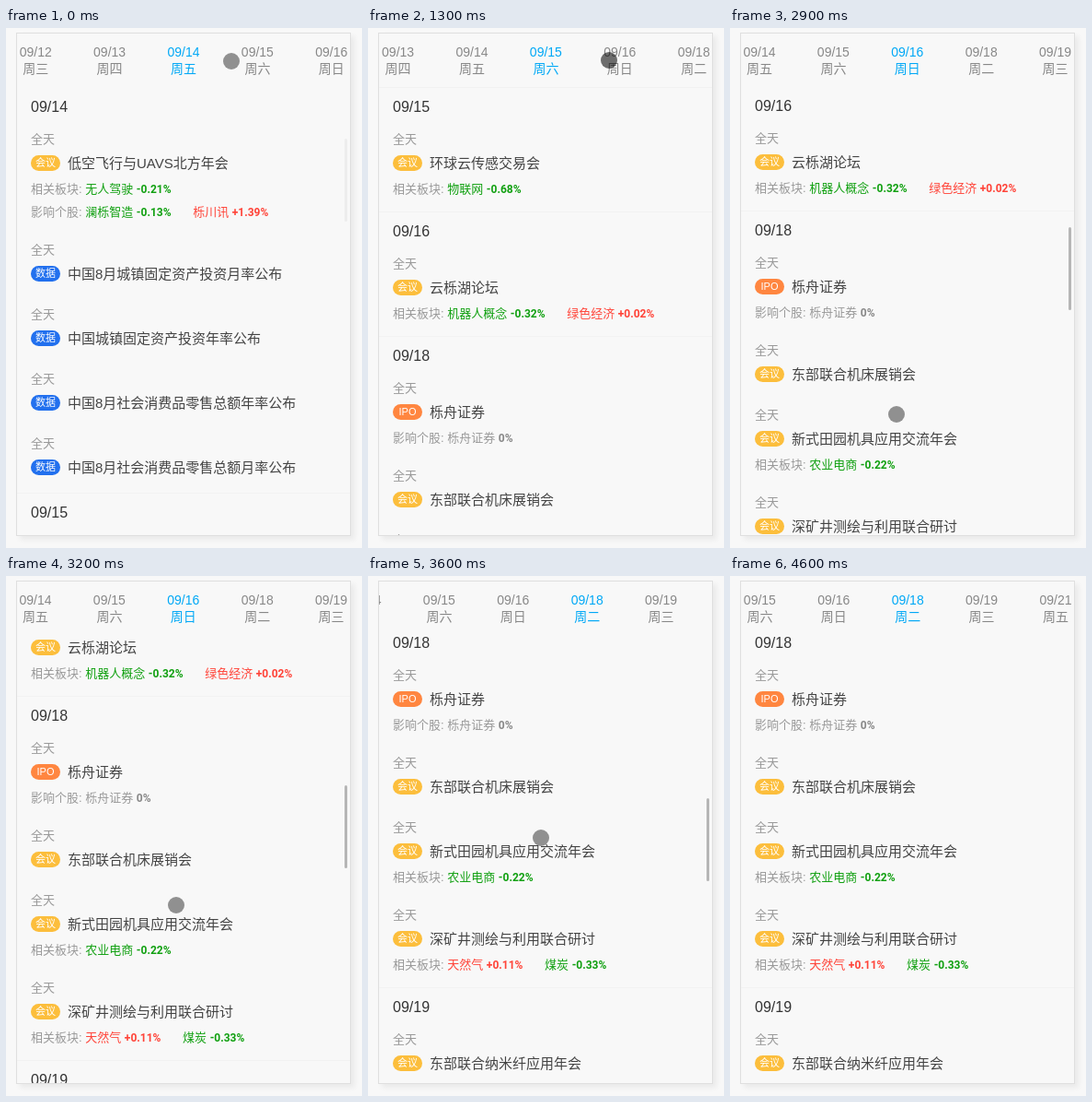
An HTML page that plays this animation: 387 px wide and 564 px high, repeating every 4700 ms.

```html
<!DOCTYPE html>
<html lang="zh-CN">
<head>
<meta charset="utf-8">
<title>财经日历</title>
<style>
  html, body { margin: 0; width: 100%; height: 100%; overflow: hidden; background: #f8f8f8; }
  body { position: relative; font-family: "Liberation Sans", "Noto Sans CJK SC", "Noto Sans CJK", sans-serif; }
  .panel {
    position: absolute; left: 11px; top: 5px; width: 362px; height: 544px;
    border: 1px solid #dfdfdf; background: #f8f8f8; overflow: hidden;
    box-shadow: 4px 4px 6px rgba(0, 0, 0, .06);
  }
  .days { position: absolute; left: 0; top: 11px; color: #888; font-size: 14px; line-height: 18px; }
  .day { position: absolute; width: 80px; text-align: center; white-space: nowrap; }
  .day.on { color: #00a8f6; }
  .view { position: absolute; left: 0; top: 58px; width: 362px; height: 486px; overflow: hidden; }
  .list { padding-left: 15px; white-space: nowrap; }
  section { position: relative; }
  section + section::before {
    content: ""; position: absolute; left: -15px; right: 0; top: 0; height: 1px; background: #f2f2f2;
  }
  h2 { margin: 0; height: 40px; font-size: 16px; font-weight: 400; line-height: 44px; color: #333; }
  .item { padding-bottom: 12px; color: #999; font-size: 13px; }
  .time { height: 34px; line-height: 34px; }
  .title { display: flex; height: 17px; margin-bottom: 7px; font-size: 15px; line-height: 17px; color: #444; }
  .tag {
    width: 32px; margin-right: 8px; border-radius: 9px;
    font-size: 11px; text-align: center; color: #fff;
  }
  .meet { background: #fcbe3c; }
  .data { background: #2270ee; }
  .ipo { background: #ff8640; }
  .info { height: 25px; line-height: 25px; }
  .info span { margin-right: 20px; }
  .info b { font: bold 12px Roboto, sans-serif; }
  .up { color: #ff4338; }
  .down { color: #11a011; }
  .flat b { color: #888; }
  .thumb {
    position: absolute; left: 356px; top: 0; width: 3px; height: 90px;
    border-radius: 2px; background: #b6b6b6;
  }
  .cursor {
    position: absolute; left: -9px; top: -9px; width: 18px; height: 18px;
    border-radius: 50%; background: #000;
  }
</style>
</head>
<body>
<div class="panel">
  <div class="days"></div>
  <div class="view"><div class="list"></div></div>
  <div class="thumb"></div>
</div>
<div class="cursor"></div>
<script>
const LOOP = 4700, STEP = 100, PITCH = 80.4;

const days = ["09/12 周三", "09/13 周四", "09/14 周五", "09/15 周六",
  "09/16 周日", "09/18 周二", "09/19 周三", "09/21 周五"];

const tags = { meet: "会议", data: "数据", ipo: "IPO" };
const SECTOR = "相关板块", STOCK = "影响个股";

// Each item: tag, title, then info lines of label and "name change" pairs
const sections = [
  ["09/14", [
    ["meet", "低空飞行与UAVS北方年会", [SECTOR, "无人驾驶 -0.21%"], [STOCK, "澜栎智造 -0.13%", "栎川讯 +1.39%"]],
    ["data", "中国8月城镇固定资产投资月率公布"],
    ["data", "中国城镇固定资产投资年率公布"],
    ["data", "中国8月社会消费品零售总额年率公布"],
    ["data", "中国8月社会消费品零售总额月率公布"]]],
  ["09/15", [
    ["meet", "环球云传感交易会", [SECTOR, "物联网 -0.68%"]]]],
  ["09/16", [
    ["meet", "云栎湖论坛", [SECTOR, "机器人概念 -0.32%", "绿色经济 +0.02%"]]]],
  ["09/18", [
    ["ipo", "栎舟证券", [STOCK, "栎舟证券 0%"]],
    ["meet", "东部联合机床展销会"],
    ["meet", "新式田园机具应用交流年会", [SECTOR, "农业电商 -0.22%"]],
    ["meet", "深矿井测绘与利用联合研讨", [SECTOR, "天然气 +0.11%", "煤炭 -0.33%"]]]],
  ["09/19", [
    ["meet", "东部联合纳米纤应用年会"]]]
];

const $ = s => document.querySelector(s);

function quote(text) {
  const [name, change] = text.split(" ");
  const trend = { "+": "up", "-": "down" }[change[0]] || "flat";
  return `<span class="${trend}">${name} <b>${change}</b></span>`;
}

const info = ([label, ...quotes]) =>
  `<div class="info">${label}: ${quotes.map(quote).join(" ")}</div>`;

const item = ([tag, title, ...lines]) =>
  `<div class="item"><div class="time">全天</div>
   <div class="title"><span class="tag ${tag}">${tags[tag]}</span>${title}</div>${lines.map(info).join("")}</div>`;

$(".list").innerHTML = sections.map(([date, items]) =>
  `<section><h2>${date}</h2>${items.map(item).join("")}</section>`).join("");

$(".days").innerHTML = days.map((d, i) =>
  `<div class="day" style="left:${141 + PITCH * (i - 2)}px">${d.replace(" ", "<br>")}</div>`).join("");

// Progress from 0 to 1 between two times
const ramp = (t, from, to) => Math.min(1, Math.max(0, (t - from) / (to - from)));
const ease = (t, from, to) => 1 - (1 - ramp(t, from, to)) ** 2;

// Two taps on the day strip, then a drag with a short glide
const drag = t => 114 * ramp(t, 2895, 3400) + 34 * ease(t, 3400, 3600);
const scroll = t => 440 * ease(t, 400, 1000) + 135 * ease(t, 1400, 1600) + drag(t);
const shift = t => ease(t, 400, 1000) + ease(t, 1400, 1600) + ease(t, 3500, 3900);

// The scroll thumb appears at once and fades over 200 ms
const flash = (t, from, to) => ramp(t, from, from + STEP) - ramp(t, to, to + 200);
const thumbAlpha = t => (t < 500 ? .17 : 0) + flash(t, 400, 800) + flash(t, 1400, 1700) + flash(t, 2800, 4000);

// Cursor moves: start, end, dx, dy
const moves = [
  [0, 200, 21, -3], [400, 1000, -14, 4], [1100, 1300, 10, -2],
  [1700, 2000, -52, 203], [2000, 2300, -25, 189], [2300, 2500, -5, 3],
  [2800, 2900, 1, -10], [2900, 3400, 7, 0], [4300, 4500, 175, -158]
];

function pointer(t) {
  let x = 245, y = 36 - .92 * drag(t);
  for (const [from, to, dx, dy] of moves) {
    const k = ramp(t, from, to);
    x += dx * k;
    y += dy * k;
  }
  return [Math.round(x), Math.round(y)];
}

function cursorAlpha(t) {
  if (t >= 4600) return 0;
  const pressed = t >= 1300 && t < 1500;
  return pressed ? .56 : .42;
}

const list = $(".list"), strip = $(".days"), thumb = $(".thumb"), cursor = $(".cursor");
const cells = [...document.querySelectorAll(".day")];

function draw(t) {
  const y = scroll(t), x = shift(t), [cx, cy] = pointer(t);
  list.style.transform = `translateY(${-Math.round(y)}px)`;
  strip.style.transform = `translateX(${-Math.round(x * PITCH)}px)`;
  thumb.style.transform = `translateY(${Math.round(114 + y / 6)}px)`;
  thumb.style.opacity = thumbAlpha(t);
  cursor.style.transform = `translate(${cx}px, ${cy}px)`;
  cursor.style.opacity = cursorAlpha(t);
  const active = 2 + Math.ceil(x - .001);
  cells.forEach((c, i) => c.classList.toggle("on", i === active));
}

const start = performance.now();
function tick() {
  const t = (performance.now() - start) % LOOP;
  draw(Math.floor(t / STEP) * STEP);
  requestAnimationFrame(tick);
}
tick();
</script>
</body>
</html>
```
